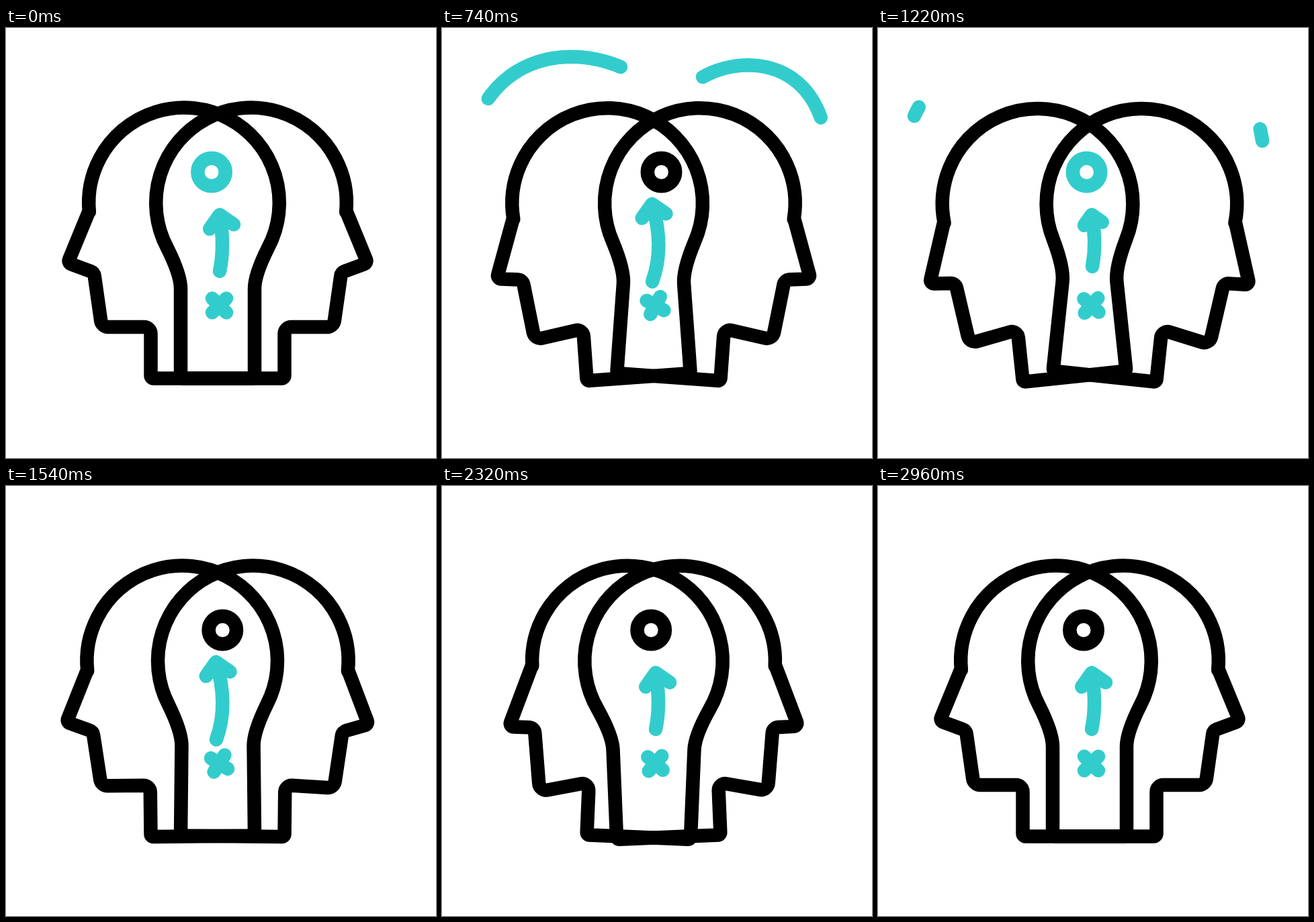
Recreate the animation shown at these times as an HTML page with a canvas. Size 640 by 640 pixels, loop 3060 ms.

```html
<!DOCTYPE html>
<html lang="en">
<head>
<meta charset="utf-8">
<title>Two minds</title>
<style>
html, body { margin: 0; width: 100%; height: 100%; overflow: hidden; background: #fff; }
canvas { display: block; }
</style>
</head>
<body>
<canvas id="stage" width="640" height="640"></canvas>
<script>
const ctx = document.getElementById('stage').getContext('2d');
const LOOP = 3060, TEAL = '#33cccc', BLACK = '#000', RAD = Math.PI / 180;

const mix = (a, b, k) => a + (b - a) * k;
const clamp = p => Math.min(1, Math.max(0, p));
const ramp = (t, from, to) => (1 - Math.cos(Math.PI * clamp((t - from) / (to - from)))) / 2;

// Swings 0, 1, 0, 1 ... reaching one extreme at each beat.
function swing(t, beats) {
  let value = 0;
  for (let i = 1; i < beats.length; i++) {
    value += (i % 2 ? 1 : -1) * ramp(t, beats[i - 1], beats[i]);
  }
  return value;
}

const SWAY = [240, 960, 1320, 1700, 2200, 2610, 2910];
const JAW_LEFT = [240, 1060, 1540, 2280, 2910];
const JAW_RIGHT = [270, 1040, 1760, 2420, 2960];

function stroke(color) {
  ctx.strokeStyle = color;
  ctx.stroke();
}

function head(lean, jaw) {
  const cx = 265, cy = 260.3, r = 141.8, low = 28 * RAD;
  ctx.save();
  ctx.translate(266, 521);
  ctx.rotate(lean * RAD);
  ctx.translate(-266, -521);
  ctx.beginPath();
  ctx.moveTo(123, 274);
  ctx.arcTo(92 + jaw, 349.5 + 16 * jaw, 131, 364 + jaw, 5);
  ctx.arcTo(131, 364 + jaw, 142.5, 445 + 15 * jaw, 9);
  ctx.arcTo(142.5, 445 + 15 * jaw, 215.5, 445 - 2 * jaw, 11);
  ctx.arcTo(215.5, 445 - 2 * jaw, 215.5, 521.5, 10);
  ctx.arcTo(215.5, 521.5, 370, 521.5, 4);
  ctx.arcTo(370, 521.5, 370, 388, 4);
  ctx.lineTo(370, 388);
  ctx.quadraticCurveTo(370, 367, cx + r * Math.cos(low), cy + r * Math.sin(low));
  ctx.arc(cx, cy, r, low, 174.5 * RAD, true);
  ctx.closePath();
  stroke(BLACK);
  ctx.restore();
}

function heads(t) {
  const lean = -6.6 * ramp(t, 240, 1100) + 10.7 * ramp(t, 1100, 1920) - 4.1 * ramp(t, 1920, 2820);
  head(lean, swing(t, JAW_LEFT));
  ctx.save();
  ctx.translate(630, 0);
  ctx.scale(-1, 1);
  head(lean, swing(t, JAW_RIGHT));
  ctx.restore();
}

// The ring is black on its way right and teal on its way back.
function ring(t) {
  const beat = SWAY.filter(b => b <= t).length;
  ctx.beginPath();
  ctx.arc(306 + 26 * swing(t, SWAY), 214.5, 20.7, 0, 2 * Math.PI);
  stroke(beat % 2 ? BLACK : TEAL);
}

function arrow(t) {
  const pull = ramp(t, 240, 740) - ramp(t, 2640, 2900)
    - 2 * swing(t, [740, 1220, 1540, 2000, 2640]);
  const long = Math.max(0, pull), short = Math.max(0, -pull);
  const x = 318 - 5.5 * long, y = 278 - 16 * long, barb = 1 - 0.25 * short;
  ctx.beginPath();
  ctx.moveTo(x - 14.8 * barb, y + 21 * barb);
  ctx.lineTo(x, y);
  ctx.lineTo(x + 21 * barb, y + 14.5 * barb);
  ctx.moveTo(x, y);
  ctx.quadraticCurveTo(326 + 6 * long, 325 - 7 * short, 318 - 5 * long + short, 362 + 15.5 * long - 7 * short);
  stroke(TEAL);
}

function cross(t) {
  const a = 10.5;
  ctx.save();
  ctx.translate(317.5, 413);
  ctx.rotate(-20 * swing(t, SWAY) * RAD);
  ctx.beginPath();
  for (const s of [-1, 1]) {
    ctx.moveTo(-a, -a * s);
    ctx.lineTo(a, a * s);
  }
  stroke(TEAL);
  ctx.restore();
}

// Part of a cubic curve between u0 and u1, scaled about a point above the heads.
function arcPart(c, u0, u1, scale) {
  const at = (u, n) => {
    const v = 1 - u;
    return v * v * v * c[n] + 3 * v * v * u * c[n + 2] + 3 * v * u * u * c[n + 4] + u * u * u * c[n + 6];
  };
  ctx.beginPath();
  for (let i = 0; i <= 40; i++) {
    const u = mix(u0, u1, i / 40);
    ctx.lineTo(mix(315, at(u, 0), scale), mix(90, at(u, 1), scale));
  }
  stroke(TEAL);
}

function arcs(t) {
  const first = t < 1400;
  const u1 = first ? ramp(t, 260, 870) : ramp(t, 2400, 2680);
  const u0 = first ? ramp(t, 760, 1300) : ramp(t, 2560, 2880);
  if (u1 <= 0 || u0 >= 1) return;
  const scale = first ? 1 : 0.85;
  arcPart([266, 58, 190, 26, 95, 42, 54, 131], u0, u1, scale);
  arcPart([388, 73, 450, 38, 555, 48, 572, 168], u0, u1, scale);
}

function draw(t) {
  ctx.fillStyle = '#fff';
  ctx.fillRect(0, 0, 640, 640);
  ctx.lineWidth = 20.5;
  ctx.lineCap = ctx.lineJoin = 'round';
  heads(t);
  ring(t);
  arrow(t);
  cross(t);
  arcs(t);
}

const start = performance.now();
function loop() {
  draw((performance.now() - start) % LOOP);
  requestAnimationFrame(loop);
}
loop();
</script>
</body>
</html>
```
